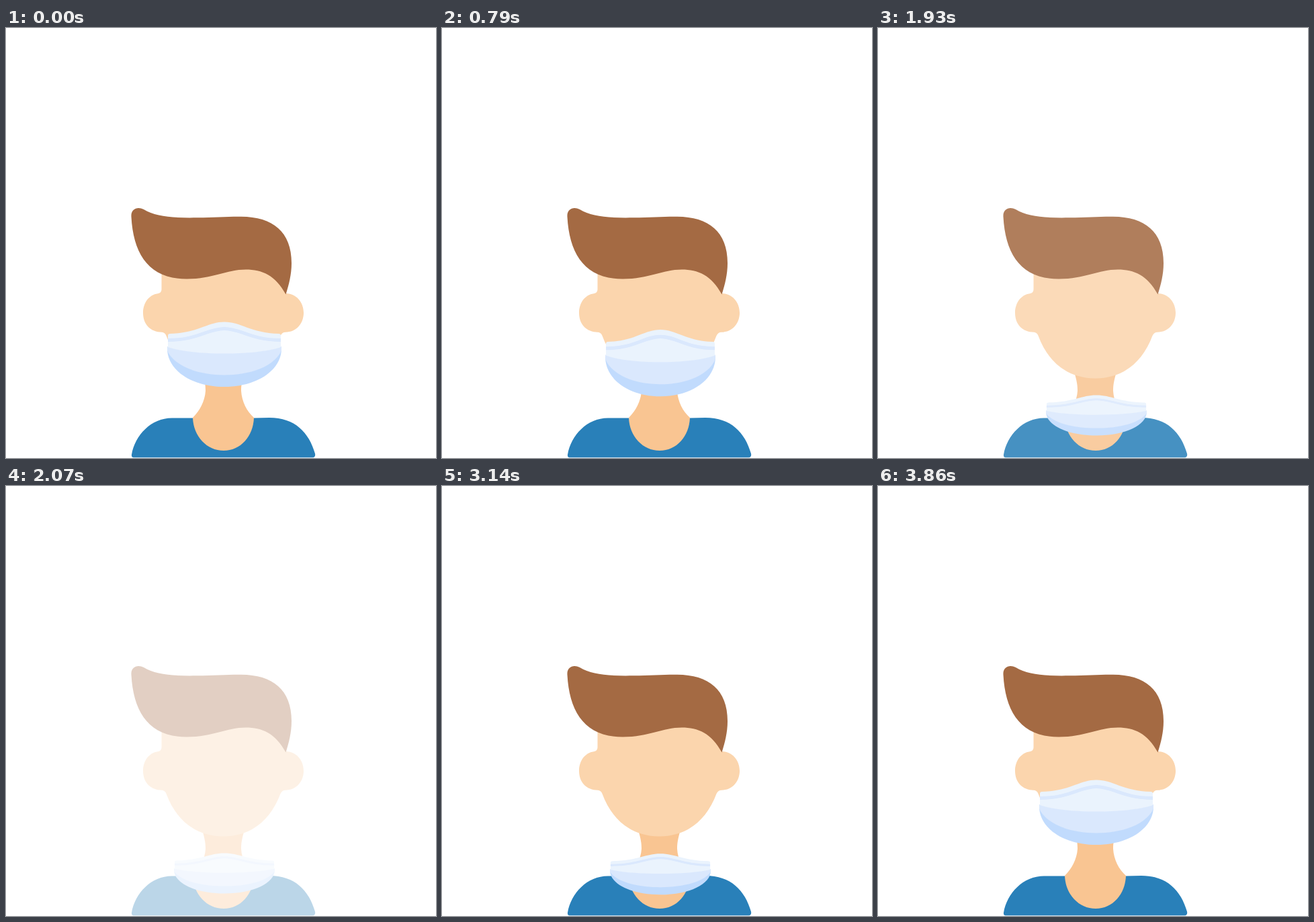
Animation, 640 px wide and 640 px high, one loop 4.57 s. Source, as an HTML page:

```html
<!DOCTYPE html>
<html lang="en">
<head>
<meta charset="utf-8">
<title>Face mask</title>
<style>
  html, body { margin: 0; height: 100%; overflow: hidden; background: #fff; }
  svg { display: block; width: 100%; height: 100%; }
</style>
</head>
<body>
<svg viewBox="0 0 640 640">
  <g id="person">
    <path fill="#2980b9" d="M190 639.300Q186.500 639.300 187 635C192 606 216 580.500 247 580.500H369L392 580C430 580 451 602 460 633.500Q461 639 456.500 639.300Z"/>
    <path fill="#f9c592" d="M292 512C296 525 297 532 297 540C296 556 288 570 278 580C279 608 299 629 324 629C349 629 368 608 369 580C358 570 351 556 350 540C350 532 351 525 355 512Z"/>
    <path fill="#fbd5ad" d="M231.500 340V389Q231.500 394.500 226 395.300C213 397 204 409 204 424C204 441 215 452.700 232 452.700Q236.500 453 238.500 458C254 500 285 521.500 323.500 521.500C362 521.500 393 500 408.500 458Q411 452.700 416 452.700C432 452.700 443 440 443 424C443 408 432 395.500 417 395L405 340Z"/>
    <path fill="#a46a43" d="M186.500 281C185.500 269 196 265 205 270C223 281 250 283 285 282.300C310 281.800 330 280.500 350 280.700C397 281 425 303 425 350C425 367 421 382 416.500 396.500C401 368 381 359.500 357 359.500C328 359.500 308 373.500 269 373.500C213 373.500 189.500 337 186.500 281Z"/>
    <g id="mask">
      <path fill="#c1dbfd" d="M240 476C239 508 275 534 325 534C375 534 411 508 410 476Z"/>
      <path fill="#dae8fd" d="M240 474V480C250 503 285 516.500 325 516.500C365 516.500 400 503 410 480V474Z"/>
      <path fill="#eaf3fd" d="M241 475V458Q241 455 244 455C286 454 300 437.500 325 437.500C350 437.500 364 454 406 455Q409 455 409 458V475C388 482 355 484.500 325 484.500C295 484.500 262 482 241 475Z"/>
      <path fill="none" stroke="#dae8fd" stroke-width="5" d="M241 464.500C286 464.500 300 447.500 325 447.500C350 447.500 364 464.500 409 464.500"/>
    </g>
  </g>
</svg>
<script>
const LOOP = 4570, STEPS = 64;
const person = document.getElementById('person');
const mask = document.getElementById('mask');

// Mask poses: top, bottom, width
const WORN = [437.5, 534, 170];
const STRETCHED = [405, 522, 170];
const LOWERED = [546.5, 606.5, 150];
const DIPPED = [548, 610, 150];

const gentle = u => 0.7 * u + 0.3 * u * u * (3 - 2 * u);
const easeIn = u => u ** 1.2;

// Start step, end step, from, to, easing
const moves = [
  [0, 6, WORN, STRETCHED, gentle],
  [6, 21, STRETCHED, LOWERED, gentle],
  [21, 43, LOWERED, LOWERED, gentle],
  [43, 45, LOWERED, DIPPED, gentle],
  [45, 54, DIPPED, WORN, easeIn],
  [54, STEPS, WORN, WORN, gentle]
];

function draw(step) {
  const [start, end, from, to, ease] = moves.find(m => step < m[1]);
  const p = ease((step - start) / (end - start));
  const [top, bottom, width] = from.map((v, i) => v + (to[i] - v) * p);
  const sx = width / 170, sy = (bottom - top) / 96.5;
  mask.setAttribute('transform',
    `translate(325 ${top}) scale(${sx} ${sy}) translate(-325 -437.5)`);
  // The whole scene dips to white and returns
  person.setAttribute('opacity', Math.min(1, Math.abs(step - 30.15) / 3.65));
}

// The motion advances in 14 steps per second
const begin = performance.now();
function tick() {
  const t = Math.max(0, performance.now() - begin) % LOOP;
  draw(Math.min(STEPS - 1, Math.floor(t / LOOP * STEPS + 0.07)));
  requestAnimationFrame(tick);
}
tick();
</script>
</body>
</html>
```
